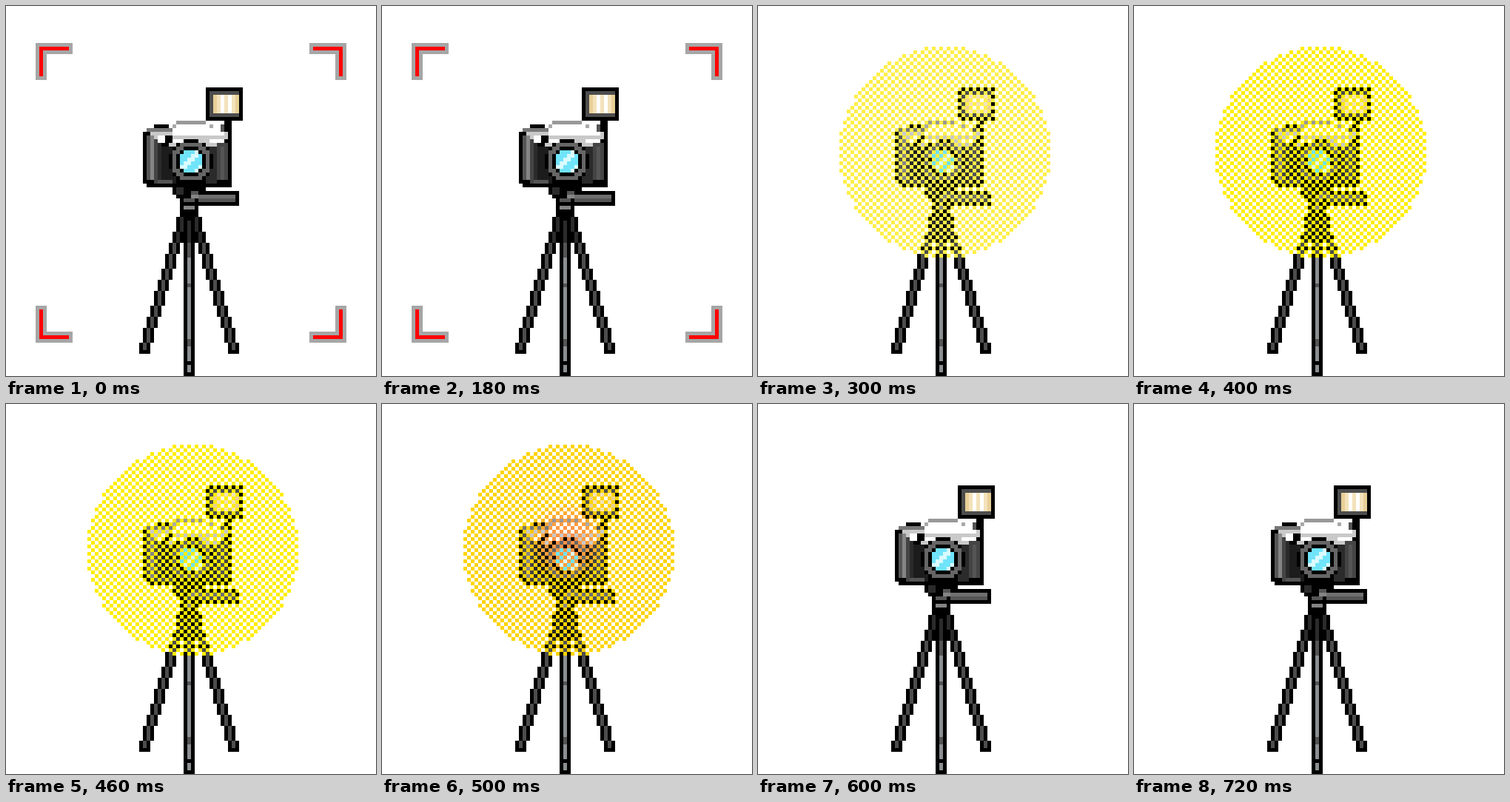
Recreate the animation shown at these times as an HTML page with a canvas. Size 500 by 500 pixels, loop 800 ms.

```html
<!DOCTYPE html>
<html lang="en">
<head>
<meta charset="utf-8">
<title>Camera flash</title>
<style>
  html, body { margin: 0; width: 100%; height: 100%; overflow: hidden; background: #fff; }
  canvas { display: block; width: 500px; height: 500px; }
</style>
</head>
<body>
<canvas id="stage" width="500" height="500"></canvas>
<script>
const ctx = document.getElementById('stage').getContext('2d');
ctx.scale(5, 5); // one unit is one art pixel

const LOOP = 800, FLASH_START = 300, FLASH_STEP = 100, FLASH_END = 600;
const BLACK = '#000', DARK = '#2b2b2b', MID = '#555', GRAY = '#858585', SILVER = '#c9c9c9', WHITE = '#fff';

function box(color, x, y, w = 1, h = 1) {
  ctx.fillStyle = color;
  ctx.fillRect(x, y, w, h);
}

function eachInDisc(cx, cy, r, visit) {
  for (let y = Math.floor(cy - r); y < cy + r; y++)
    for (let x = Math.floor(cx - r); x < cx + r; x++)
      if (Math.hypot(x + 0.5 - cx, y + 0.5 - cy) < r) visit(x, y);
}

function disc(color, cx, cy, r) {
  eachInDisc(cx, cy, r, (x, y) => box(color, x, y));
}

function drawCorners() {
  for (const right of [false, true])
    for (const bottom of [false, true]) {
      const part = (color, x, y, w, h) =>
        box(color, right ? 100 - x - w : x, bottom ? 101 - y - h : y, w, h);
      part('#a6a6a6', 8, 10, 10, 3);
      part('#a6a6a6', 8, 10, 3, 10);
      part('#f00', 9, 11, 8, 1);
      part('#f00', 9, 11, 1, 8);
    }
}

function drawTripod() {
  for (let y = 57; y < 94; y++) {
    const left = 43 - Math.floor((y - 67) * 3 / 10);
    for (const x of [left, 96 - left]) {
      box(BLACK, x, y, 3);
      if (y < 93) box(y < 64 ? DARK : '#4d4d4d', x + 1, y);
    }
  }
  // centre column
  box(BLACK, 48, 55, 3, 45);
  box(GRAY, 49, 55);
  box(DARK, 49, 58, 1, 6);
  box(MID, 49, 64, 1, 4);
  box('#8b8f92', 49, 68, 1, 22);
  box(MID, 49, 75);
  box(MID, 49, 90, 1, 2);
  box('#8b8f92', 49, 92, 1, 4);
  box(BLACK, 49, 96);
  box('#8b8f92', 49, 97, 1, 2);
  // head and handle
  box(BLACK, 45, 49, 9, 2);
  box(BLACK, 46, 51, 7, 1);
  box(DARK, 46, 49, 2, 2);
  box(MID, 50, 50, 3);
  box(BLACK, 52, 50, 11, 4);
  box('#6f6f6f', 52, 51, 10, 2);
  box(MID, 52, 52, 10);
  box(BLACK, 47, 52, 5, 5);
  box(MID, 48, 52, 3);
  box(GRAY, 50, 51, 2);
  box(GRAY, 48, 54, 3);
}

function drawFlashHead() {
  box(BLACK, 59, 31, 2, 3);
  box(MID, 58, 32, 1, 2);
  box(BLACK, 54, 22, 10, 9);
  box('#4d4d4d', 55, 23, 8, 7);
  const stripes = ['#e8cf98', '#f3e2ba', WHITE, '#f3e2ba', WHITE, '#f3e2ba', '#e8cf98'];
  stripes.forEach((color, i) => box(color, 56 + i, 24, 1, 5));
}

function drawBody() {
  box(BLACK, 38, 33, 22, 16);
  box(BLACK, 37, 34, 24, 14);
  box(BLACK, 60, 34, 1, 15);
  // silver top
  box(BLACK, 40, 32, 4);
  box('#999', 46, 31, 8);
  box('#aaa', 45, 32, 11);
  box(WHITE, 46, 32, 9);
  box('#777', 38, 33, 7);
  box(SILVER, 39, 34, 21, 2);
  box(WHITE, 45, 33, 14, 2);
  box(WHITE, 41, 35, 2, 2);
  box(SILVER, 45, 35, 14, 2);
  box(WHITE, 55, 36, 4);
  box(WHITE, 45, 36, 3);
  box(SILVER, 44, 37, 2);
  box(SILVER, 54, 37, 4);
  box(BLACK, 43, 35, 2, 2);
  // grips
  box(MID, 38, 35, 1, 12);
  box(GRAY, 39, 35, 1, 12);
  box('#444', 40, 36, 1, 12);
  box(DARK, 41, 37, 1, 11);
  box('#1c1c1c', 42, 38, 4, 10);
  box(DARK, 54, 38, 3, 10);
  box('#444', 57, 37, 3, 10);
  box(MID, 58, 38, 1, 9);
  box(MID, 41, 47, 4);
  // lens
  disc(BLACK, 50, 42, 6);
  disc('#666', 50, 42, 5.2);
  disc(BLACK, 50, 42, 4.3);
  eachInDisc(50, 42, 3.4, (x, y) =>
    box((x + y) % 5 < 2 ? '#d9fbff' : '#70e4fa', x, y));
}

function drawFlash(step) {
  let color = ['#ffef48', '#ffee00', '#ffd400'][step];
  if (step === 2) {
    const glow = ctx.createRadialGradient(50, 37, 2, 50, 37, 11);
    glow.addColorStop(0, '#ff9148');
    glow.addColorStop(0.5, '#ffa03c');
    glow.addColorStop(1, color);
    color = glow;
  }
  eachInDisc(50.5, 39.5, 28.5, (x, y) => {
    if ((x + y) % 2 === 0) box(color, x, y);
  });
}

function draw(now) {
  const t = now % LOOP;
  box(WHITE, 0, 0, 100, 100);
  drawTripod();
  drawBody();
  drawFlashHead();
  if (t < FLASH_START) drawCorners();
  else if (t < FLASH_END) drawFlash(Math.floor((t - FLASH_START) / FLASH_STEP));
}

const start = performance.now();
function tick() {
  draw(performance.now() - start);
  requestAnimationFrame(tick);
}
tick();
</script>
</body>
</html>
```
